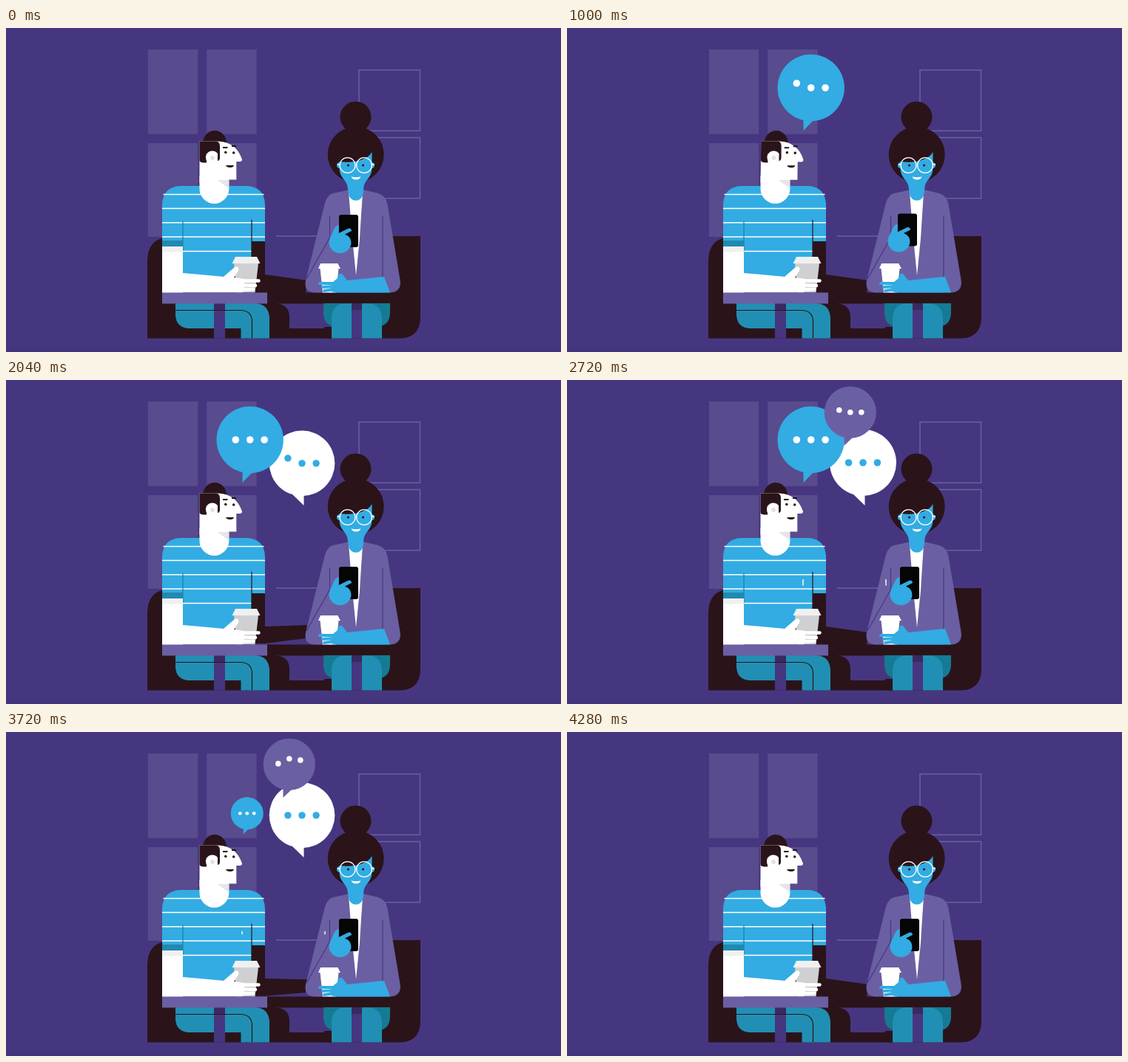
An HTML page for the animation above (4.32 s loop, 750 by 439 pixels).

```html
<!DOCTYPE html>
<html lang="en">
<head>
<meta charset="utf-8">
<title>Coffee chat</title>
<style>
  html, body { margin: 0; width: 100%; height: 100%; overflow: hidden; background: #463680; }
  svg { display: block; width: 100vw; height: 100vh; }
  .dark { fill: #2a1419; }
  .blue { fill: #32ace3; }
  .jean { fill: #218fb3; }
  .lilac { fill: #6b5fa3; }
  .white { fill: #fff; }
  .pane { fill: #584b8e; }
  .line { fill: none; stroke-width: 1.2; }
  .round { fill: none; stroke-linecap: round; }
</style>
</head>
<body>
<svg viewBox="0 0 750 439">
  <rect width="750" height="439" fill="#463680"/>
  <rect y="434" width="750" height="5" fill="#43347b"/>

  <!-- room -->
  <g class="pane">
    <rect x="192" y="29" width="67.3" height="114.7"/>
    <rect x="271.3" y="29" width="67.3" height="114.7"/>
    <rect x="192" y="156" width="67.3" height="127"/>
    <rect x="271.3" y="156" width="67.3" height="127"/>
  </g>
  <g fill="none" stroke="#6b5fa3" stroke-width="1.5">
    <rect x="477" y="57" width="82.5" height="82.3"/>
    <rect x="477" y="148.5" width="82.5" height="82.3"/>
    <path d="M365 282H420"/>
  </g>

  <!-- sofa -->
  <g class="dark">
    <path d="M191 420.500V316Q191 283 224 283H332V373H364Q383 374 383 392V407H440V420.500Z"/>
    <path d="M510 282H560V393Q559 420 532 420.500H430V405H505Z"/>
    <rect x="340" y="358.500" width="200" height="15"/>
  </g>

  <!-- legs -->
  <rect x="281" y="373" width="15" height="47.500" fill="#463680"/>
  <rect x="281" y="373" width="15" height="9" fill="#3a2960"/>
  <path class="jean" d="M229 373H281V407H247Q230 406 229 389Z"/>
  <path class="jean" d="M296 373H337Q355 374 356 393V420.500H317.500V407H296Z"/>
  <path class="line" stroke="#2a1419" d="M229 382.500H317Q332.500 383 332.500 398V420"/>
  <path fill="#157a94" d="M429 373H519V387Q518 404 501 405H447Q430 404 429 387Z"/>
  <rect x="467" y="373" width="14" height="47.500" fill="#463680"/>
  <rect x="467" y="373" width="14" height="9" fill="#3a2960"/>
  <path class="jean" d="M440 420.500V392Q441 375 457 373.500H467V420.500ZM481 420.500V373.500H491Q507 375 508 392V420.500Z"/>

  <!-- far arm -->
  <path class="dark" d="M331 288H350V340H331Z"/>
  <path id="arm" class="dark"/>

  <!-- woman -->
  <circle class="dark" cx="472.500" cy="120.500" r="21"/>
  <circle class="dark" cx="472.700" cy="171.500" r="38"/>
  <path class="lilac" d="M463 219.500L442 224Q434 226 431 237L405 342Q402 358 418 358.500H520Q535 357 532.500 341L515.500 239Q513 227 503 224L482 219Z"/>
  <path class="white" d="M463 222H482L478 285L473 335L468 285Z"/>
  <path class="line" stroke="#46377f" d="M437.500 254V284L406 340M509 254V338"/>
  <g class="blue">
    <circle cx="451" cy="186" r="4"/>
    <circle cx="494" cy="186" r="4"/>
    <path d="M450.500 181Q468 183 479 179Q490 176 494.500 168V191C494 203 484 207 483.500 215L482.500 225A9.800 9.800 0 0 1 463 225L461.500 215C461 207 451 203 450.500 191Z"/>
  </g>
  <g fill="none" stroke="#fff" stroke-width="1.300">
    <circle cx="461.500" cy="186" r="10.400"/>
    <circle cx="484" cy="186" r="10.400"/>
    <path d="M448 185H451M494.500 185H498"/>
  </g>
  <g class="eyes dark" data-y="186">
    <circle cx="462.500" cy="186" r="1.500"/>
    <circle cx="482.500" cy="186" r="1.500"/>
  </g>
  <path class="white" d="M466.500 201.500Q473 203 479.500 201.500Q478 205.500 473 205.500Q468 205.500 466.500 201.500Z"/>

  <g id="phone">
    <rect x="450" y="253" width="26" height="44" rx="3" fill="#050506"/>
    <path class="blue" d="M449.500 267V278L463 271.500Q467 271 467 275L458 279.500Q466.500 283 466.500 291A15 14.500 0 0 1 436.500 290Q437 284 441 278Q445 267 449.500 267Z"/>
  </g>

  <path class="white" d="M425 319H448.500L450 322.500L452 326H422L423.500 322.500ZM424.500 326H449.500L446 358.500H428Z"/>
  <path class="blue" d="M448 339L450 333H454L461 342L511 337L519 358.500H444L437 356L442 344Z"/>
  <path class="round" stroke="#32ace3" stroke-width="3.800" d="M424 346L444 346M428 351L444 350M430 356L444 354"/>

  <!-- man -->
  <path class="blue" d="M211 289V239Q212 215 236 214H325Q349 215 350 239V289H332V337H239V289Z"/>
  <path stroke="#fff" stroke-width="1.400" d="M212.500 225.500H348.500M211 244.500H350M211 263.700H350M211 283H350M239 302.500H332"/>
  <path class="line" stroke="#1c7fa6" d="M239 262V302"/>
  <path class="line" stroke="#2a1419" d="M332 260V312"/>
  <rect x="211" y="288" width="28" height="8.500" fill="#2189ae"/>
  <rect x="211" y="296" width="28" height="63" fill="#fff"/>
  <rect x="211" y="296" width="28" height="7.500" fill="#f0f0f2"/>

  <path fill="#cfd0d2" d="M308 319H341L336.500 358.500H312Z"/>
  <path fill="#f0f0f1" d="M310 310H339L341 314L343.500 319H305.500L308 314Z"/>
  <path class="white" d="M239 332L294 337L309 324Q315 322 314.500 328L308 338L322 340V356L319 358.500H230Z"/>
  <path class="round" stroke="#fff" stroke-width="4.500" d="M318 342.500H341.500M318 348.500L337 349M318 354.500L334 354"/>

  <path class="white" d="M261.500 200H301.300V218A19.900 19.900 0 0 1 261.500 218Z"/>
  <path fill="#e6e6e9" d="M285 205.500H301.300V217.500Z"/>
  <g id="head">
    <path class="dark" d="M266 156A16 17 0 0 1 298 156Z"/>
    <path class="white" d="M261.500 210V153.500H286Q311 154 319 178Q319 181 316 181H311.300V205.500H301L285 206Z"/>
    <path class="dark" d="M261.500 153.500H284Q289 154 289 160V176Q289 180 285.500 180V170H271V182.500H266Q261.500 182 261.500 179Z"/>
    <path class="white" d="M286 170V181A9 9 0 1 1 286 170Z"/>
    <circle cx="279" cy="176" r="3" fill="#e3e3e7"/>
    <path stroke="#2a1419" stroke-width="2" d="M293 162H299.500M305 160H311"/>
    <g class="eyes dark" data-y="168.500">
      <circle cx="296.800" cy="168.500" r="1.800"/>
      <circle cx="307.700" cy="169" r="1.800"/>
    </g>
    <path class="dark" d="M297 186H308Q307.500 189 303 189Q298 189 297 186Z"/>
  </g>

  <rect class="lilac" x="211" y="358.500" width="142" height="15"/>

  <g id="steam" stroke="#fff" stroke-width="1.400"></g>
  <g id="bubbles"></g>
</svg>
<script>
const LOOP = 4320, STEP = 40;
const NS = 'http://www.w3.org/2000/svg';
const $ = id => document.getElementById(id);

function add(parent, tag, attrs) {
  const el = document.createElementNS(NS, tag);
  for (const k in attrs) el.setAttribute(k, attrs[k]);
  return parent.appendChild(el);
}

const clamp = v => Math.max(0, Math.min(1, v));

// Eased value from [time, value] steps
function track(steps, t) {
  if (t <= steps[0][0]) return steps[0][1];
  for (let i = 1; i < steps.length; i++) {
    const [t0, a] = steps[i - 1], [t1, b] = steps[i];
    if (t <= t1) return a + (b - a) * (1 - Math.cos(Math.PI * (t - t0) / (t1 - t0))) / 2;
  }
  return steps[steps.length - 1][1];
}

const bubbles = [
  { x: 400, y: 112, r: 45, gap: 19.4, dot: 4.8, fill: '#fff', ink: '#32ace3',
    tail: 'M384 152L402.500 170V150Z', pivot: [402, 170], waves: [1945],
    size: [[1480, 0], [1760, 1], [2040, .985], [2400, 1], [3360, 1], [3720, .985], [3860, 1.03], [4060, 0]] },
  { x: 329.7, y: 81, r: 45.2, gap: 19.4, dot: 4.8, fill: '#32ace3', ink: '#fff',
    tail: 'M319.500 120V139L335 123Z', pivot: [322, 138], waves: [924],
    size: [[400, 0], [640, 1.108], [780, 1], [3440, 1], [3580, 1.108], [3840, 0]] },
  { x: 382.8, y: 43.8, r: 35.1, gap: 15, dot: 3.8, fill: '#6b5fa3', ink: '#fff',
    tail: 'M374.500 75V89L387 77Z', pivot: [383, 44], waves: [2686, 3450],
    size: [[2120, 0], [2370, 1.12], [2500, 1], [3960, 1], [4080, 1.12], [4250, 0]] }
];

for (const b of bubbles) {
  b.g = add($('bubbles'), 'g', { fill: b.fill });
  add(b.g, 'circle', { cx: b.x, cy: b.y, r: b.r });
  add(b.g, 'path', { d: b.tail });
  b.dots = [-1, 0, 1].map(i => add(b.g, 'circle', { cx: b.x + i * b.gap, cy: b.y, r: b.dot, fill: b.ink }));
}

const plumes = [
  { x: 319, top: 270, starts: [2240, 3200], rise: 200, end: 560 },
  { x: 323, top: 248, starts: [2880], rise: 300, end: 640 }
];
for (const p of plumes) p.lines = [0, 112].map(dx => add($('steam'), 'line', { x1: p.x + dx, x2: p.x + dx }));

const armLift = [[160, 0], [500, 1], [900, 0], [1240, 0], [1300, 0], [2040, 1], [2680, 0], [2740, 0], [3280, 1], [3400, 1], [4220, 0]];
const headTilt = [[160, 0], [520, -1.8], [960, .7], [1100, .7], [1600, 0]];
const phoneShift = [[160, 0], [520, 3], [960, -3], [1100, -3], [1240, 0]];
const blinks = [[1400, 2200, 2800, 4160], [2200, 2800]];

function lift(b, i, t) {
  let up = 0;
  for (const s of b.waves) {
    const u = (t - s - i * 100) / 280;
    if (u > 0 && u < 1) up = 8 * Math.sin(Math.PI * u);
  }
  return up;
}

function draw(t) {
  for (const b of bubbles) {
    const s = track(b.size, t), [px, py] = b.pivot;
    b.g.setAttribute('transform', `translate(${px} ${py}) scale(${s}) translate(${-px} ${-py})`);
    b.g.setAttribute('visibility', s > .01 ? 'visible' : 'hidden');
    b.dots.forEach((d, i) => d.setAttribute('cy', b.y - lift(b, i, t)));
  }

  for (const p of plumes) {
    const start = p.starts.filter(s => s <= t).pop();
    const age = start === undefined ? 0 : t - start;
    const y = k => 303 - (303 - p.top) * clamp(k);
    const head = y(age / p.rise), tail = y((age - 250) / (p.end - 250));
    for (const l of p.lines) {
      l.setAttribute('y1', head);
      l.setAttribute('y2', tail);
    }
  }

  const a = track(armLift, t);
  $('arm').setAttribute('d', `M332 334H350L407 ${342 - 10 * a}L405 ${359 - 9 * a}L350 ${359 - 2 * a}H332Z`);
  $('head').setAttribute('transform', `rotate(${track(headTilt, t)} 281 215)`);
  const shift = track(phoneShift, t);
  $('phone').setAttribute('transform', `translate(${shift} ${shift / 2})`);

  document.querySelectorAll('.eyes').forEach((el, i) => {
    const shut = blinks[i].some(s => t >= s && t < s + 120);
    const y = el.dataset.y;
    el.setAttribute('transform', `translate(0 ${y}) scale(1 ${shut ? .25 : 1}) translate(0 ${-y})`);
  });
}

const begin = performance.now();
function tick() {
  const t = (performance.now() - begin) % LOOP;
  draw(Math.floor(t / STEP) * STEP);
  requestAnimationFrame(tick);
}
tick();
</script>
</body>
</html>
```
